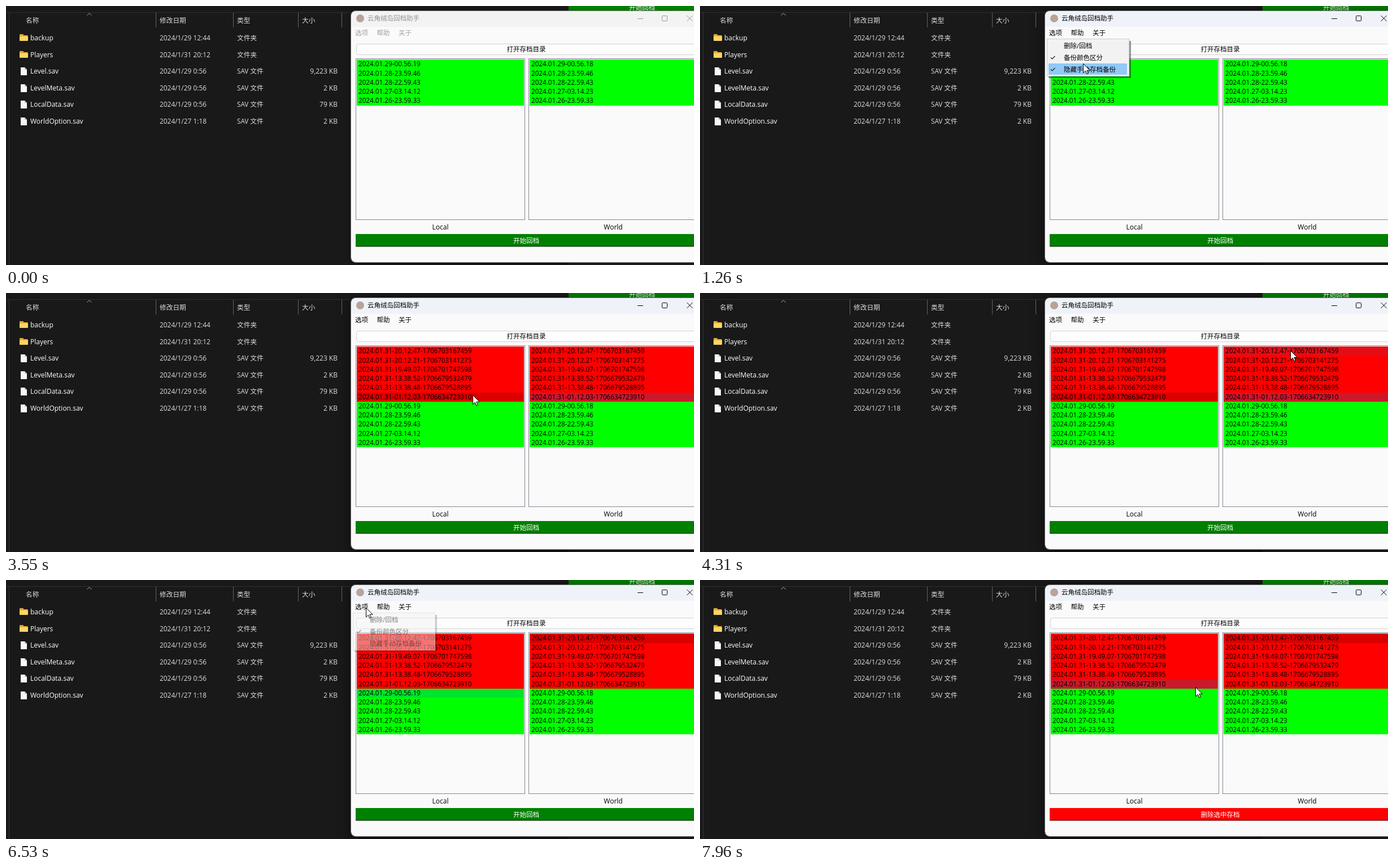
Animation of 1218x460 px, one loop 8 s. Source, as an HTML page with a canvas:

```html
<!DOCTYPE html>
<html lang="zh-CN">
<head>
<meta charset="utf-8">
<style>
  html, body { margin: 0; width: 100%; height: 100%; overflow: hidden; background: #191919; }
  canvas { display: block; }
</style>
</head>
<body>
<canvas id="stage" width="1218" height="460"></canvas>
<script>
const ctx = document.getElementById('stage').getContext('2d');
const FONT = '"Open Sans", "Noto Sans CJK SC", "Noto Sans CJK", sans-serif';
const LOOP = 8000;
const ACTIVATED = 480, LIST_FILLED = 1850, DELETE_MODE = 6960;

const rowTop = i => Math.round(95.4 + 16.25 * i);
const itemTop = i => 60 + 21 * i;

const columns = [['名称', 35], ['修改日期', 272], ['类型', 409], ['大小', 524]];
const files = [
  ['backup', '2024/1/29 12:44'],
  ['Players', '2024/1/31 20:12'],
  ['Level.sav', '2024/1/29 0:56', '9,223 KB'],
  ['LevelMeta.sav', '2024/1/29 0:56', '2 KB'],
  ['LocalData.sav', '2024/1/29 0:56', '79 KB'],
  ['WorldOption.sav', '2024/1/27 1:18', '2 KB']
];

// Manual saves are named after their local time (UTC+8) and epoch milliseconds
function saveName(epoch) {
  const iso = new Date(epoch + 8 * 3600e3).toISOString();
  return iso.slice(0, 19).replace('T', '+').replace(/[-:]/g, '.').replace('+', '-') + '-' + epoch;
}
const manualSaves = [
  1706703167459, 1706703141275, 1706701747598,
  1706679532479, 1706679528895, 1706634723910
].map(saveName);
const autoSaves = (first, fourth) => [
  '2024.01.29-00.56.' + first, '2024.01.28-23.59.46', '2024.01.28-22.59.43',
  '2024.01.27-03.14.' + fourth, '2024.01.26-23.59.33'
];
const lists = [
  { x: 619, name: 'Local', auto: autoSaves(19, 12) },
  { x: 925, name: 'World', auto: autoSaves(18, 23) }
];
const menuItems = ['删除/回档', '备份颜色区分', '隐藏手动存档备份'];

// Clicks on rows: time, selected row per list, list with focus
const selections = [
  [0, [-1, -1], 0], [3420, [5, 5], 1], [4920, [0, 0], 0],
  [5820, [6, 0], 0], [7760, [5, 0], 0]
];
// Pointer moves: start, end, destination
const start = { x: 1218, y: 300 };
const moves = [
  [140, 560, 797, 397],
  [560, 980, 634, 46],
  [1080, 1250, 678, itemTop(2)],
  [1300, 1410, 678, itemTop(2) + 12],
  [2060, 2290, 846, 284],
  [2290, 2710, 860, 339],
  [2860, 3000, 804, rowTop(5) + 4],
  [3420, 3760, 871, rowTop(5) + 4],
  [3900, 4310, 1045, rowTop(0) + 7],
  [4920, 5440, 850, rowTop(5) + 8],
  [5500, 5670, 838, rowTop(6) + 3],
  [5900, 6430, 637, 49],
  [6620, 6760, 650, itemTop(0) + 1],
  [6960, 7210, 745, rowTop(4) + 12],
  [7590, 7950, 877, rowTop(5) + 13]
];
const arrow = new Path2D('M0 0V16.3L3.9 12.7 6.4 18.4 8.8 17.4 6.4 11.8H11.6Z');

function rect(x, y, w, h, color) {
  ctx.fillStyle = color;
  ctx.fillRect(x, y, w, h);
}
function roundRect(x, y, w, h, r, fill, stroke) {
  ctx.beginPath();
  ctx.roundRect(x, y, w, h, r);
  if (fill) { ctx.fillStyle = fill; ctx.fill(); }
  if (stroke) { ctx.strokeStyle = stroke; ctx.lineWidth = 1; ctx.stroke(); }
}
function text(str, x, y, color, size = 11.5, align = 'left') {
  ctx.font = `${size}px ${FONT}`;
  ctx.textAlign = align;
  ctx.fillStyle = color;
  ctx.fillText(str, x, y);
}
function line(points, color, width = 1) {
  ctx.beginPath();
  points.forEach(([x, y]) => ctx.lineTo(x, y));
  ctx.strokeStyle = color;
  ctx.lineWidth = width;
  ctx.stroke();
}
const progress = (t, from, to) => Math.min(1, Math.max(0, (t - from) / (to - from)));
const ease = k => k * k * (3 - 2 * k);

function pointerAt(t) {
  if (t < moves[0][0]) return null;
  let { x, y } = start;
  for (const [from, to, toX, toY] of moves) {
    const k = ease(progress(t, from, to));
    x += (toX - x) * k;
    y += (toY - y) * k;
  }
  return { x: Math.round(x), y: Math.round(y) };
}
function menuOpacity(t) {
  if (t < 1830) return progress(t, 1040, 1170);
  return t < 6940 ? progress(t, 6470, 6600) : 0;
}

function drawFolder(x, y) {
  roundRect(x, y, 7, 5, 1, '#e3a52c');
  roundRect(x, y + 2, 15, 10, 1.5, '#e9ae35');
  roundRect(x, y + 4, 15, 8, 1.5, '#ffd563');
}
function drawPage(x, y) {
  ctx.fillStyle = '#f7f7f7';
  ctx.fill(new Path2D(`M${x} ${y}h7l4 4v10h-11z`));
  ctx.fillStyle = '#b9b9b9';
  ctx.fill(new Path2D(`M${x + 7} ${y}v4h4z`));
}
function drawExplorer() {
  rect(0, 0, 1218, 460, '#191919');
  rect(0, 11, 611, 1, '#303030');
  rect(5, 12, 1, 448, '#353535');
  line([[143.5, 16.5], [147.5, 13], [151.5, 16.5]], '#b0b0b0');
  columns.forEach(([label, x], i) => {
    text(label, x, 30, '#dedede', 11.7);
    if (i) rect(x - 7, 12, 1, 26, '#636363');
  });
  rect(594, 12, 1, 26, '#636363');
  files.forEach(([name, date, size], i) => {
    const y = 61 + Math.round(i * 29.6);
    if (size) drawPage(26, y - 11); else drawFolder(24, y - 11);
    text(name, 43, y, '#ffffff', 12);
    text(date, 272, y, '#dedede', 11.9);
    text(size ? 'SAV 文件' : '文件夹', 409, y, '#dedede', 11.7);
    if (size) text(size, 587, y, '#dedede', 12, 'right');
  });
  rect(996, 0, 222, 8, '#008000');
  text('开始回档', 1126, 7, '#ffffff', 11.5, 'center');
  rect(996, 456, 222, 4, '#202228');
}

function drawWindow(active) {
  ctx.save();
  ctx.shadowColor = `rgba(0,0,0,${active ? 0.55 : 0.35})`;
  ctx.shadowBlur = active ? 24 : 10;
  ctx.shadowOffsetY = active ? 5 : 2;
  roundRect(611, 9, 640, 446, 8, '#fafafa');
  ctx.restore();
  roundRect(611, 9, 640, 28, [8, 8, 0, 0], active ? '#eff3f9' : '#f3f3f3');
  roundRect(610.5, 8.5, 641, 447, 8, null, '#707070');

  const ink = active ? '#000000' : '#929292';
  ctx.beginPath();
  ctx.arc(627, 22, 7, 0, 7);
  ctx.fillStyle = '#b9a298';
  ctx.fill();
  text('云角绒岛回档助手', 640, 26, ink);
  line([[1118, 22.5], [1128, 22.5]], ink);
  roundRect(1161.5, 17.5, 9, 9, 1, null, ink);
  line([[1205.5, 17], [1215.5, 27]], ink);
  line([[1215.5, 17], [1205.5, 27]], ink);
  ['选项', '帮助', '关于'].forEach((label, i) =>
    text(label, 618 + i * 38.5, 51.5, active ? '#000000' : '#a0a0a0'));

  roundRect(620.5, 67.5, 620, 19, 4, '#fdfdfd', '#d0d0d0');
  text('打开存档目录', 921, 81, '#000000', 11.5, 'center');
}

function drawList({ x, name, auto }, index, t, pointer) {
  ctx.strokeStyle = '#828790';
  ctx.lineWidth = 1;
  ctx.strokeRect(x + 0.5, 93.5, 299, 286);
  text(name, x + 150, 397, '#000000', 12, 'center');

  const manual = t >= LIST_FILLED ? manualSaves : [];
  const [, selected, focus] = selections.findLast(s => s[0] <= t);
  const inside = pointer && !menuOpacity(t) && pointer.x >= x + 2 && pointer.x < x + 298;

  [...manual, ...auto].forEach((label, i) => {
    const top = rowTop(i), height = rowTop(i + 1) - top;
    const row = color => rect(x + 2, top, 296, height, color);
    const hovered = inside && pointer.y >= top && pointer.y < top + height;
    row(i < manual.length ? '#ff0000' : '#00ff00');
    if (i === selected[index]) row(focus === index ? 'rgba(0,120,215,.2)' : 'rgba(0,0,0,.15)');
    else if (hovered) row('rgba(0,120,215,.1)');
    text(label, x + 5, top + 12, '#000000', 11.7);
  });
}

function drawActionButton(deleting) {
  rect(619, 405, 599, 22, deleting ? '#ff0000' : '#008000');
  rect(619, 426, 599, 1.5, deleting ? '#800000' : '#003c00');
  text(deleting ? '删除选中存档' : '开始回档', 921, 420.5, '#ffffff', 11.5, 'center');
}

function drawMenu(t, pointer) {
  const opacity = menuOpacity(t);
  if (!opacity) return;
  ctx.save();
  ctx.globalAlpha = opacity;
  rect(760, 62, 3, 66, 'rgba(0,0,0,.4)');
  rect(617, 125, 143, 3, 'rgba(0,0,0,.4)');
  rect(614, 58, 146, 67, '#f2f2f2');
  ctx.strokeStyle = '#cccccc';
  ctx.lineWidth = 1;
  ctx.strokeRect(614.5, 58.5, 145, 66);
  menuItems.forEach((label, i) => {
    const top = itemTop(i);
    if (pointer.y >= top && pointer.y < itemTop(i + 1)) rect(617, top, 139, 20, '#91c9f7');
    const checked = i === 1 || (i === 2 && t < LIST_FILLED);
    if (checked) line([[621, top + 10.5], [623.5, top + 13], [628.5, top + 8]], '#202020', 1.2);
    text(label, 644, top + 14.5, '#000000');
  });
  ctx.restore();
}

function drawPointer({ x, y }) {
  ctx.save();
  ctx.translate(x + 0.5, y + 0.5);
  ctx.fillStyle = '#ffffff';
  ctx.fill(arrow);
  ctx.strokeStyle = '#000000';
  ctx.lineWidth = 1;
  ctx.stroke(arrow);
  ctx.restore();
}

function draw(now) {
  const t = now % LOOP;
  const pointer = pointerAt(t);
  drawExplorer();
  drawWindow(t >= ACTIVATED);
  lists.forEach((list, i) => drawList(list, i, t, pointer));
  drawActionButton(t >= DELETE_MODE);
  drawMenu(t, pointer);
  if (pointer) drawPointer(pointer);
  requestAnimationFrame(draw);
}
requestAnimationFrame(draw);
</script>
</body>
</html>
```
